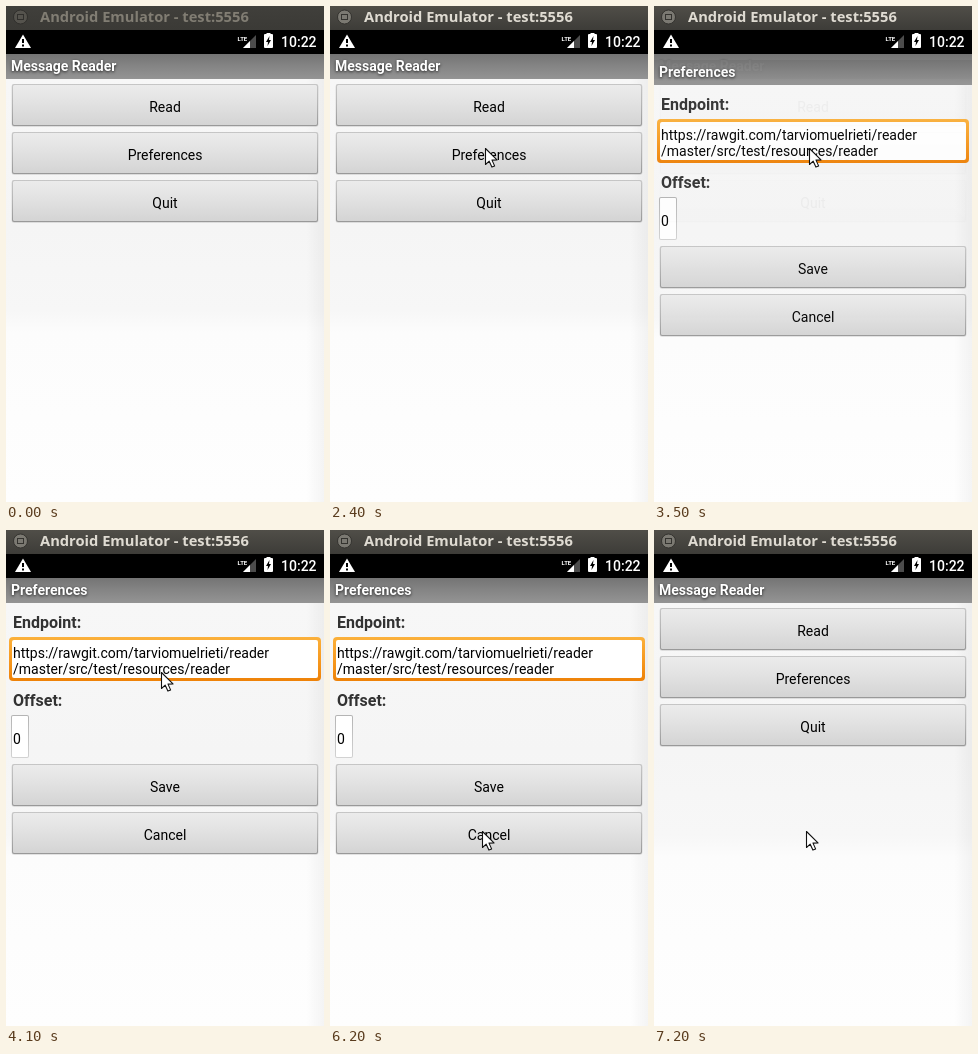
Animation of 318 by 496 pixels, one loop 8 s. Source, as an HTML page with a canvas:

```html
<!DOCTYPE html>
<html lang="en">
<head>
<meta charset="utf-8">
<title>Message Reader</title>
<style>
html, body { margin: 0; width: 100%; height: 100%; overflow: hidden; background: #fdfdfd; }
canvas { display: block; width: 318px; height: 496px; }
</style>
</head>
<body>
<canvas id="stage" width="318" height="496"></canvas>
<script>
const W = 318, H = 496, LOOP = 8000;
const BAR_TOP = 48, BAR_BOTTOM = 73;
const UI = 'Roboto, sans-serif';
const CARET_TOGGLES = [3600, 4100, 4600, 5000, 5500, 6000, 6500, 6900];
const ctx = document.getElementById('stage').getContext('2d');

function fade(c, y0, y1, ...stops) {
  const g = c.createLinearGradient(0, y0, 0, y1);
  stops.forEach((color, i) => g.addColorStop(i / (stops.length - 1), color));
  return g;
}

function text(c, str, x, y, font, color, align = 'left') {
  c.font = font;
  c.fillStyle = color;
  c.textAlign = align;
  c.fillText(str, x, y);
}

function poly(c, points, color) {
  c.beginPath();
  points.forEach(([x, y]) => c.lineTo(x, y));
  c.closePath();
  c.fillStyle = color;
  c.fill();
}

function box(c, x, y, w, h, r, color) {
  c.beginPath();
  c.roundRect(x, y, w, h, r);
  c.fillStyle = color;
  c.fill();
}

function button(c, label, y) {
  box(c, 5.5, y, 307, 43, 3, 'rgba(0,0,0,.10)');
  box(c, 6, y, 306, 42, 2, fade(c, y, y + 42, '#c6c6c6', '#b4b4b4', '#989898'));
  box(c, 7, y + 1, 304, 40, 1.5, fade(c, y, y + 41, '#ececec', '#e1e1e1', '#d4d4d4'));
  text(c, label, 159, y + 28, '14px ' + UI, '#000', 'center');
}

function makeScreen(title, paint) {
  const canvas = document.createElement('canvas');
  canvas.width = W;
  canvas.height = H;
  const c = canvas.getContext('2d');
  const bg = c.createLinearGradient(0, BAR_BOTTOM, 0, H);
  [[0, '#f7f7f7'], [.35, '#f5f5f5'], [.55, '#f7f7f7'], [.6, '#fcfcfc'], [1, '#fefefe']]
    .forEach(([at, color]) => bg.addColorStop(at, color));
  c.fillStyle = bg;
  c.fillRect(0, BAR_BOTTOM, W, H - BAR_BOTTOM);
  const edge = c.createLinearGradient(300, 0, W, 0);
  edge.addColorStop(0, 'rgba(0,0,0,0)');
  edge.addColorStop(1, 'rgba(0,0,0,.04)');
  c.fillStyle = edge;
  c.fillRect(300, BAR_BOTTOM, 18, H - BAR_BOTTOM);

  c.fillStyle = fade(c, BAR_TOP, BAR_BOTTOM, '#747474', '#858585', '#949494');
  c.fillRect(0, BAR_TOP, W, BAR_BOTTOM - BAR_TOP);
  c.save();
  c.shadowColor = 'rgba(0,0,0,.75)';
  c.shadowBlur = 3;
  c.shadowOffsetY = 1;
  text(c, title, 5, 65, 'bold 14px ' + UI, '#fff');
  c.restore();
  paint(c);
  return canvas;
}

const menu = makeScreen('Message Reader', c => {
  ['Read', 'Preferences', 'Quit'].forEach((label, i) => button(c, label, 78 + 48 * i));
});

const prefs = makeScreen('Preferences', c => {
  const label = 'bold 16px ' + UI, body = '14px ' + UI;
  text(c, 'Endpoint:', 7, 98, label, '#323232');
  box(c, 3, 107, 312, 44, 4, fade(c, 107, 151, '#fbb13c', '#f79a20', '#ee8208'));
  box(c, 6, 110, 306, 38, 2, '#fff');
  text(c, 'https://rawgit.com/tarviomuelrieti/reader', 7, 128, body, '#000');
  text(c, '/master/src/test/resources/reader', 7, 144, body, '#000');
  text(c, 'Offset:', 7, 176, label, '#323232');
  box(c, 5, 185, 18, 43, 2, fade(c, 185, 228, '#b4b4b4', '#d2d2d2'));
  box(c, 6, 186, 16, 41, 1, '#fff');
  text(c, '0', 7, 214, body, '#000');
  button(c, 'Save', 234);
  button(c, 'Cancel', 282);
});

function windowBar(active) {
  ctx.fillStyle = active ? fade(ctx, 0, 24, '#504e48', '#3d3c38') : fade(ctx, 0, 24, '#403f3b', '#3b3a36');
  ctx.fillRect(0, 0, W, 24);
  ctx.beginPath();
  ctx.arc(14.5, 11, 7, 0, 7);
  ctx.fillStyle = active ? '#7b7972' : '#55534d';
  ctx.fill();
  ctx.lineWidth = 1;
  ctx.strokeStyle = active ? '#34332f' : '#302f2c';
  ctx.stroke();
  ctx.strokeRect(11.5, 8.5, 6, 5);
  text(ctx, 'Android Emulator - test:5556', 34, 16,
    'bold 14.7px "Noto Sans", "Open Sans", sans-serif', active ? '#dfdbd2' : '#817d73');
}

function statusBar() {
  ctx.fillStyle = '#000';
  ctx.fillRect(0, 24, W, 24);
  poly(ctx, [[17, 28.5], [25, 42], [9, 42]], '#fff');
  ctx.fillStyle = '#000';
  ctx.fillRect(16, 33, 2, 4);
  ctx.fillRect(16, 38.5, 2, 2);
  poly(ctx, [[250, 29], [250, 42], [237, 42]], '#4c4c4c');
  poly(ctx, [[244, 35], [244, 42], [237, 42]], '#fff');
  text(ctx, 'LTE', 231.5, 35, 'bold 6px ' + UI, '#fff');
  ctx.fillStyle = '#fff';
  ctx.fillRect(260.5, 27, 4, 2);
  box(ctx, 258, 28, 9, 14, 1, '#fff');
  poly(ctx, [[263.5, 30], [260, 36], [262, 36], [261.5, 40], [265, 34], [263, 34]], '#000');
  text(ctx, '10:22', 275, 41, '500 14px ' + UI, '#fff');
}

function pointer(x, y) {
  ctx.save();
  ctx.translate(x + .5, y + .5);
  poly(ctx, [[0, 0], [0, 16], [3.7, 12.7], [6.4, 18.6], [9.1, 17.4], [6.5, 11.6], [11.5, 11.4]], '#fff');
  ctx.lineWidth = 1.1;
  ctx.lineJoin = 'round';
  ctx.strokeStyle = '#111';
  ctx.stroke();
  ctx.restore();
}

// Position and opacity of the preferences screen, advancing in 100 ms ticks
function prefsPose(t) {
  if (t < 3400 || t >= 7200) return null;
  if (t < 7000) {
    const k = Math.floor((t - 3400) / 100);
    return { y: Math.round(18 * .33 ** k), alpha: k > 2 ? 1 : 1 - .26 * .15 ** k };
  }
  return t < 7100 ? { y: 4, alpha: .9 } : { y: 24, alpha: .35 };
}

function draw(t) {
  ctx.drawImage(menu, 0, 0);
  const pose = prefsPose(t);
  if (pose) {
    ctx.globalAlpha = pose.alpha;
    ctx.drawImage(prefs, 0, pose.y);
    ctx.globalAlpha = 1;
    if (CARET_TOGGLES.filter(at => at <= t).length % 2) {
      ctx.fillStyle = '#222';
      ctx.fillRect(7, 114 + pose.y, 1, 17);
    }
  }
  windowBar(t >= 500);
  statusBar();
  if (t >= 5900) pointer(152, 301);
  else if (t >= 500) pointer(155, 142);
}

const start = performance.now();
function tick() {
  draw((performance.now() - start) % LOOP);
  requestAnimationFrame(tick);
}
tick();
</script>
</body>
</html>
```
